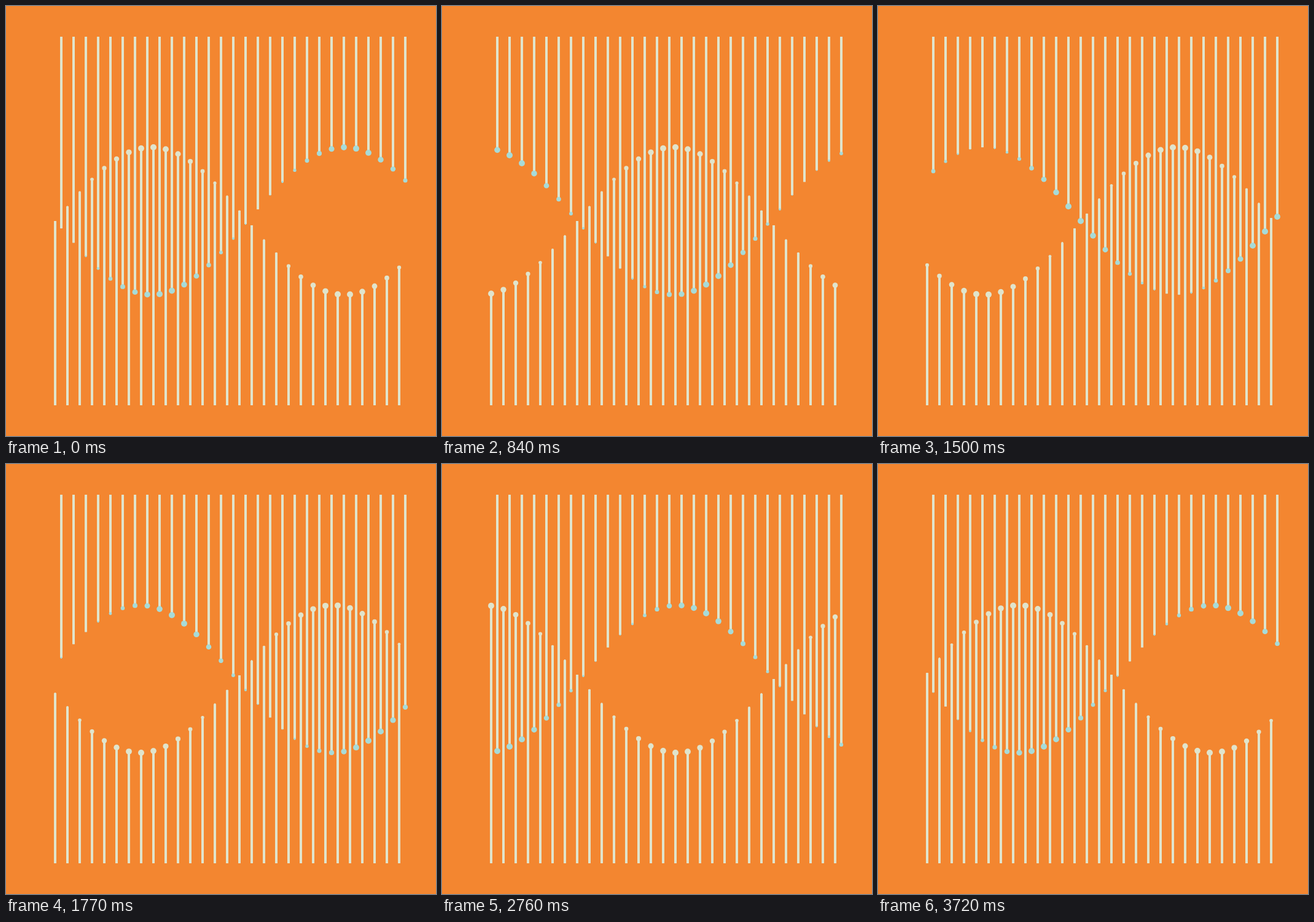
Animation, 700 px wide and 700 px high, one loop 3750 ms. Source, as an HTML page with a canvas:

```html
<!DOCTYPE html>
<html lang="en">
<head>
<meta charset="utf-8">
<title>Pin waves</title>
<style>
  html, body { margin: 0; width: 100%; height: 100%; overflow: hidden; background: #F38630; }
  canvas { display: block; }
</style>
</head>
<body>
<canvas id="stage" width="700" height="700"></canvas>
<script>
const ctx = document.getElementById('stage').getContext('2d');

const STEP_MS = 30;
const STEPS = 125;
const PINS = 29;
const SPACING = 20;
const MIDDLE = 350;
const AMPLITUDE = 120;
const MAX_RADIUS = 5;
const COLORS = { back: '#F38630', stem: '#E0E4CC', blueHead: '#A7DBD8' };

function drawPin(x, base, tip, radius, headColor) {
  ctx.fillStyle = COLORS.stem;
  ctx.fillRect(x - 2, Math.min(base, tip), 4, Math.abs(tip - base));
  ctx.fillStyle = headColor;
  ctx.beginPath();
  ctx.arc(x, tip, Math.abs(radius), 0, Math.PI * 2);
  ctx.fill();
}

function draw(ms) {
  const phase = Math.floor(ms / STEP_MS) % STEPS * 0.05;
  ctx.fillStyle = COLORS.back;
  ctx.fillRect(0, 0, 700, 700);

  for (let i = 0; i < PINS; i++) {
    const angle = i * 0.2;

    const rise = Math.sin(angle - phase);
    drawPin(80 + i * SPACING, 650, MIDDLE - AMPLITUDE * rise, MAX_RADIUS * rise, COLORS.stem);

    // The upper heads swell in a wave that runs against their motion.
    const drop = Math.sin(angle + 0.1 - phase);
    const swell = Math.sin(angle - 0.1 + phase);
    drawPin(90 + i * SPACING, 50, MIDDLE + AMPLITUDE * drop, MAX_RADIUS * swell, COLORS.blueHead);
  }
}

const start = performance.now();

function tick() {
  draw(performance.now() - start);
  requestAnimationFrame(tick);
}

tick();
</script>
</body>
</html>
```
